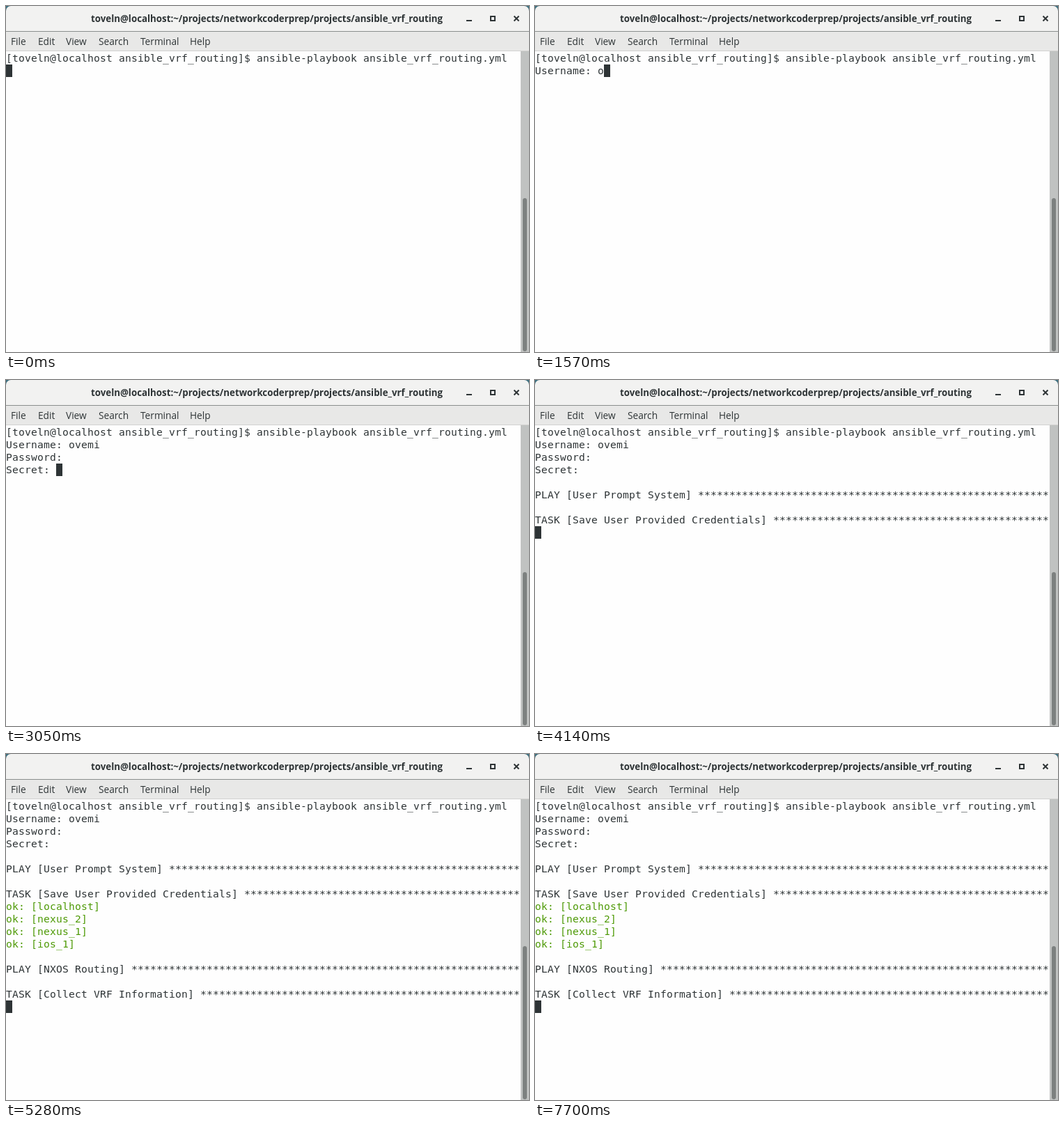
An HTML page with a canvas that plays this animation: 751 by 497 pixels, repeating every 8 s.

```html
<!DOCTYPE html>
<html lang="en">
<head>
<meta charset="utf-8">
<title>Terminal</title>
<style>
html, body { margin: 0; width: 100%; height: 100%; overflow: hidden; background: #fefefe; }
canvas { display: block; }
</style>
</head>
<body>
<canvas id="stage" width="751" height="497"></canvas>
<script>
const ctx = document.getElementById('stage').getContext('2d');
const LOOP = 8000, COLS = 82, CELL_W = 9, CELL_H = 18, TOP = 66;
const INK = '#2e3436', GREEN = '#4e9a06';
const USER = 'ovemi';

const starred = title => (title + ' ').padEnd(COLS, '*');
const command = '[toveln@localhost ansible_vrf_routing]$ ansible-playbook ansible_vrf_routing.yml';
const prompts = [command, 'Username: ' + USER, 'Password: ', 'Secret: '];
const saving = [...prompts, '', starred('PLAY [User Prompt System]'), '',
  starred('TASK [Save User Provided Credentials]')];
const collecting = [...saving, 'ok: [localhost]', 'ok: [nexus_2]', 'ok: [nexus_1]', 'ok: [ios_1]', '',
  starred('PLAY [NXOS Routing]'), '', starred('TASK [Collect VRF Information]')];
const typed = n => [command, 'Username: ' + USER.slice(0, n)];

// Start time and terminal lines; the cursor follows the last character.
const screens = [
  [0, [command, '']],
  [1140, typed(0)],
  [1570, typed(1)],
  [1690, typed(3)],
  [1840, typed(5)],
  [2120, prompts.slice(0, 3)],
  [3050, prompts],
  [4140, [...saving, '']],
  [4260, [...collecting, '']]
];
const cursorOff = [[120, 680], [1260, 1570], [4690, 5280], [5990, 6580], [7110, 7700]];

function rect(color, x, y, w, h) {
  ctx.fillStyle = color;
  ctx.fillRect(x, y, w, h);
}

function pill(color, x, y, w, h, radius) {
  ctx.fillStyle = color;
  ctx.beginPath();
  ctx.roundRect(x, y, w, h, radius);
  ctx.fill();
}

function label(text, x, y, font, color) {
  ctx.font = font;
  ctx.fillStyle = color;
  ctx.fillText(text, x, y);
}

function drawWindow() {
  rect('#fefefe', 0, 0, 751, 497);
  rect('#3f7080', 0, 0, 751, 10);
  pill('#f2f2f1', 0, 0, 751, 36, [7, 7, 0, 0]);
  rect('#8a8e8d', 0, 36, 751, 1);
  rect('#e8e8e7', 0, 37, 751, 27);
  rect('#d2d2d0', 0, 64, 751, 1);
  rect('#c0c2c1', 739, 65, 12, 432);
  pill('#7d8180', 742, 276, 6, 220, 3);

  ctx.textAlign = 'center';
  label('toveln@localhost:~/projects/networkcoderprep/projects/ansible_vrf_routing',
    374.5, 23, 'bold 13.3px "Open Sans", sans-serif', INK);
  ctx.textAlign = 'left';
  [['File', 7], ['Edit', 46], ['View', 86], ['Search', 133], ['Terminal', 193], ['Help', 264]]
    .forEach(([name, x]) => label(name, x, 56, '13.7px "Open Sans", sans-serif', INK));

  rect(INK, 661, 20, 8, 2);
  ctx.strokeStyle = INK;
  ctx.lineWidth = 2;
  ctx.strokeRect(696, 15, 6, 6);
  ctx.beginPath();
  ctx.moveTo(729.5, 14.5);
  ctx.lineTo(736.5, 21.5);
  ctx.moveTo(736.5, 14.5);
  ctx.lineTo(729.5, 21.5);
  ctx.stroke();
}

function drawTerminal(time) {
  const lines = screens.findLast(([start]) => time >= start)[1];
  ctx.font = '14.667px "DejaVu Sans Mono", monospace';
  lines.forEach((line, row) => {
    ctx.fillStyle = line.startsWith('ok:') ? GREEN : INK;
    [...line].forEach((char, col) => ctx.fillText(char, col * CELL_W, TOP + row * CELL_H + 14));
  });
  if (!cursorOff.some(([from, to]) => time >= from && time < to)) {
    const row = lines.length - 1;
    rect(INK, lines[row].length * CELL_W, TOP + row * CELL_H, CELL_W, CELL_H);
  }
}

function frame() {
  drawWindow();
  drawTerminal(performance.now() % LOOP);
  requestAnimationFrame(frame);
}
frame();
</script>
</body>
</html>
```
